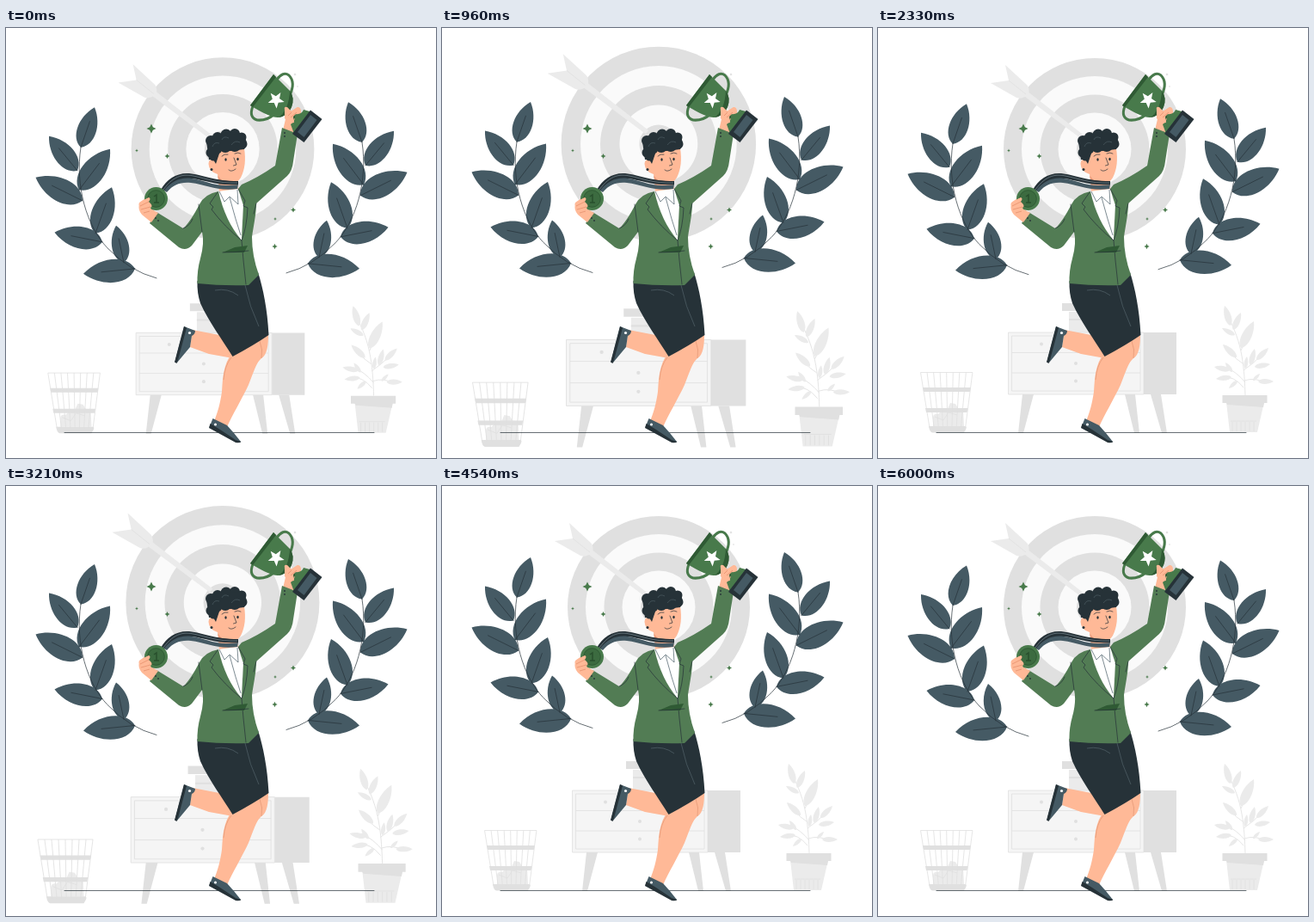
An HTML page for the animation above (6.04 s loop, 500 px wide and 500 px high).

```html
<!DOCTYPE html>
<html lang="en">
<head>
<meta charset="utf-8">
<title>Winner</title>
<style>
  html, body { margin: 0; width: 100%; height: 100%; overflow: hidden; background: #fff; }
  svg { display: block; width: 100%; height: 100%; }
  .line { fill: none; stroke: #263238; stroke-width: .7; stroke-linecap: round; stroke-linejoin: round; }
  .skin { fill: #ffb997; }
  .dark { fill: #263238; }
  .slate { fill: #455a64; }
  .green { fill: #487a4b; }
  .jacket { fill: #527c54; }
  .shade { fill: #2f5a34; }
  .g1 { fill: #e0e0e0; }
  .g2 { fill: #ebebeb; }
  .g3 { fill: #f5f5f5; }
  .thin { fill: none; stroke: #e0e0e0; stroke-width: .8; }
</style>
</head>
<body>
<svg viewBox="0 0 500 500" xmlns="http://www.w3.org/2000/svg">
  <g id="scenery">
    <g id="target"></g>
    <path class="g2" d="M148 43L173 66Q176 69 175.500 75L241 126L238 130L171 80Q166 83 161 81L131 64L152 61Z"/>
    <path class="thin" d="M152 61L172 77"/>

    <g id="cabinet">
      <path class="g1" d="M168 426H181L169 471H163ZM287 426H299L304 471H298ZM317 426H329L336 471H330Z"/>
      <path class="g1" d="M214 320H250V329H214Z"/>
      <path class="g2" d="M222 330H250V354H222Z"/>
      <path class="g1" d="M222 338H250V340H222ZM309 354H347V426H309Z"/>
      <path class="g3" d="M151.500 354H309V426H151.500Z"/>
      <path class="thin" d="M151.500 354H309V426H151.500ZM155.500 358H305V422H155.500ZM155.500 377.500H305M155.500 401H305"/>
      <g class="g1"><circle cx="190" cy="367.500" r="2"/><circle cx="230" cy="390" r="2"/><circle cx="230" cy="410.500" r="2"/></g>
    </g>

    <g id="basket">
      <path class="g2" d="M64 463V452Q65 448 70 449L75 444L80 445L84 436L90 437L93 442L99 443L100 463Z"/>
      <path class="thin" d="M66 452L76 456L82 447L92 450"/>
      <path class="g1" d="M52 418H108L107 423H53ZM55 442H104.500L103.500 447H56ZM59 463H101Q104 463 102 467L100 470.500H63Q60 470 59 463Z"/>
    </g>

    <g id="plant">
      <path class="thin" d="M427 427C426 400 425 365 405 333M425 398Q437 390 445 381M426 410Q438 406 449 412M425 418Q414 404 400 406M424 390Q416 385 410 378M422 375Q429 360 435 346M427 412Q417 400 404 394"/>
      <path class="g2" d="M405 435H449L441 470H409Z"/>
      <path class="g1" d="M400.500 427H452.500V436H400.500ZM405 436H449L448 441L406 438Z"/>
      <path class="thin" d="M412 458V469M417 458V469M422 458V469M427 458V469M432 458V469M437 458V469M410 457H440"/>
    </g>
  </g>

  <path class="line" d="M68 470.500H428"/>
  <g id="laurels"></g>
  <g id="sparkles"></g>

  <g id="legs">
    <path class="skin" d="M217 351L248 357L268 376L264 384L236 379L214 371Z"/>
    <path class="slate" d="M207 347L220 352Q220 356 216 358L214 371L199 389L196.500 388Z"/>
    <path class="dark" d="M207 347L210 348.500L200 386L198.500 390L196 388.500Z"/>
    <circle cx="213.500" cy="354.500" r="1.600" fill="#fff"/>
    <path class="skin" d="M262 379C253 392 252 405 251 423C249 437 246 447 242.500 456L257 464C263 450 274 432 282 415C288 400 291 389 297 384C304 380 305 368 305 356Z"/>
    <path d="M295 364Q299 374 297 384M262 383Q254 393 253 409" fill="none" stroke="#e59a78" stroke-width=".8"/>
    <path class="slate" d="M240.500 454L257 462L265 471L273 481L269 482L236.500 464Z"/>
    <path class="dark" d="M237.500 460L249 467L267 479L273.500 481Q272 483 267 482L236 465Z"/>
    <circle cx="243.500" cy="461" r="1.500" fill="#fff"/>
    <path class="dark" d="M222.500 294L293 284C299 303 304 327 305.500 357Q288 369 263.500 382C252 363 236 342 226 320Q222 308 222.500 294Z"/>
    <path d="M278 299Q283 324 294 347M243 305Q258 302 270 311" fill="none" stroke="#53636b" stroke-width=".7"/>
  </g>

  <g id="body">
    <path class="skin" d="M246 166H268L270 190L261 200L248 192Z"/>
    <path d="M246 190L270 187L275 205L274 247L260 227Z" fill="#fff"/>
    <path class="skin" d="M322 119L325 106L323 97Q321 92 326 92L331 97L339 92Q343 92 343 97L343 103L338 111L334 122Z"/>
    <path class="jacket" d="M247 190Q231 193 225 205C218 218 212 228 206 233L175 214L167 227L201 255Q209 260 216 253L228 237Q231 250 226 268Q222 282 222.500 297Q252 300 282 299L294 287Q286 265 286 243C288 229 291 216 291 204L327 172Q333 166 334 155L339 123L321 116L313 160Q293 174 274 182L270 187L276 206L274 247Q255 225 247 190Z"/>
    <path class="line" d="M246 191L237 204L241 208L239 211Q254 231 274 247L276 270L279 298M270 187L278 201L276 207L281 209Q280 232 274 247M228 237L224 205M291 204L288 216M206 233Q214 230 217 222"/>
    <path class="shade" d="M252 261L266 255L281 253L277 261Z"/>
    <path class="line" d="M252 261Q267 261 282 259"/>
    <path d="M248 190L254 202L260 196L270 205L269 188M260 197L267 222L273 241" fill="none" stroke="#455a64" stroke-width=".7"/>
    <g class="dark"><circle cx="174" cy="221" r=".9"/><circle cx="177" cy="224" r=".9"/><circle cx="324" cy="122" r=".9"/><circle cx="324" cy="126" r=".9"/></g>
  </g>

  <g id="head">
    <path class="skin" d="M243 143L277 140C279 153 278 164 273 174Q269 181 260 181Q250 180 246 170Q236 167 235.500 158Q236 151 243 154Z"/>
    <path d="M246 171Q251 179 259 181L267 180Q256 185 247 176Z" fill="#ef9c7b"/>
    <g id="hair" class="dark"></g>
    <path class="dark" d="M233 132Q237 123 250 124L275 123Q283 132 277 141L261 143L249 143L244 158L241 153L236 153Z"/>
    <path class="line" d="M251 149Q254 146 258 147M266 146Q270 144 273 146" stroke-width="1.100"/>
    <g class="dark"><ellipse cx="255.500" cy="153" rx="1.200" ry="1.700"/><ellipse cx="269.500" cy="152.500" rx="1.200" ry="1.700"/><circle cx="239" cy="164.500" r="1.500"/></g>
    <path class="line" d="M265 151L268 159L264.500 160M259 165Q262 168 267 164"/>
    <path d="M240 138Q242 132 248 134M251 130Q253 125 259 128M262 136Q266 130 272 133" fill="none" stroke="#53636b" stroke-width=".6"/>
  </g>

  <g id="medal">
    <path class="dark" d="M180 188C187 176 198 168 213 169C230 171 242 178 270 178V182C247 184 232 177 216 175C202 174 193 180 187 190Z"/>
    <path class="slate" d="M184 189C192 178 204 173 216 175C232 177 243 186 270 182L269 187C245 190 233 182 215 180C202 179 195 182 187 191Z"/>
    <path d="M183 188C196 170 208 170 218 172C234 175 246 181 269 180" fill="none" stroke="#7c8c93" stroke-width=".7"/>
    <path class="skin" d="M169 226L158 217Q153 211 155 205Q158 199 166 197L172 204L170 211L177 215Z"/>
    <circle class="green" cx="174.500" cy="198.500" r="13.500"/>
    <circle cx="174.500" cy="198.500" r="9.800" fill="#3c6b40" stroke="#2f5a34" stroke-width="1"/>
    <path d="M172 196L175 194V203M172 203H178" fill="none" stroke="#28502d" stroke-width="1.500"/>
    <path class="skin" d="M155 207Q153 203 158 201L166 197Q169 198 166 202L168 204Q171 207 168 209Q171 213 167 215L159 217Z"/>
    <path d="M156 207L166 202M157 211L168 208M160 215L167 213" fill="none" stroke="#e18c69" stroke-width=".7"/>
  </g>

  <g id="trophy">
    <path d="M315 60Q322 50 329 55Q337 63 330 78M287 91Q282 104 292 107Q303 108 311 101" fill="none" stroke="#487a4b" stroke-width="3"/>
    <path class="shade" d="M328 94L338 102L334 107L325 100Z"/>
    <path class="green" d="M311 54L330 73Q336 81 332 92Q328 102 317 104Q308 105 284 90Z"/>
    <path class="shade" d="M311 54L314 57L287 92L284 90ZM330 73Q336 81 332 92Q328 102 317 104Q329 95 330 73Z"/>
    <path id="star" fill="#fff"/>
    <path class="green" d="M336 100Q344 101 346 95L357 98L335 123L331 112Q337 108 336 100Z"/>
    <path class="dark" d="M354 95.500L367.500 106L346.500 133L333 123Z"/>
    <path class="slate" d="M354 101L361.500 107L346.500 127L339 121Z"/>
    <path class="skin" d="M324 95Q323 91 327 92L332 97L339 92Q343 93 340 97L334 103L335 110L329 111L324 105Z"/>
    <path d="M332 98L328 102M338 98L331 104" fill="none" stroke="#e18c69" stroke-width=".7"/>
  </g>
</svg>
<script>
const byId = id => document.getElementById(id);
const add = (id, markup) => byId(id).insertAdjacentHTML('beforeend', markup);

// Pointed leaf from base to tip; bulge is relative to its length.
function leafPath([bx, by, tx, ty], bulge = .3) {
  const dx = tx - bx, dy = ty - by;
  const at = (along, side) =>
    `${(bx + dx * along - dy * side).toFixed(1)} ${(by + dy * along + dx * side).toFixed(1)}`;
  return `M${at(0, 0)}C${at(.14, bulge)} ${at(.66, bulge)} ${at(1, 0)}` +
         `C${at(.66, -bulge)} ${at(.14, -bulge)} ${at(0, 0)}Z`;
}

function starPath(cx, cy, outer, inner, points, turn) {
  const corners = Array.from({ length: points * 2 }, (_, i) => {
    const r = i % 2 ? inner : outer, a = turn + i * Math.PI / points;
    return `${(cx + r * Math.cos(a)).toFixed(1)} ${(cy + r * Math.sin(a)).toFixed(1)}`;
  });
  return `M${corners.join('L')}Z`;
}

[106, 85, 63.5, 42.500, 21].forEach((r, i) =>
  add('target', `<circle cx="252" cy="141" r="${r}" fill="${i % 2 ? '#fafafa' : '#e0e0e0'}"/>`));

let strands = 'M49.500 400.500H110';
for (let i = 0; i <= 8; i++) strands += `M${49.5 + i * 7.55} 400.500L${60 + i * 5.2} 465`;
add('basket', `<path class="thin" d="${strands}"/>`);

const plantLeaves = [
  [410, 346, 403, 323], [413, 351, 422, 331], [415, 357, 400, 349], [422, 372, 437, 341],
  [417, 383, 401, 368], [427, 396, 429, 382], [433, 392, 438, 373], [440, 386, 454, 372],
  [438, 394, 456, 391], [412, 400, 404, 389], [409, 398, 391, 394], [411, 406, 393, 408],
  [418, 410, 408, 419], [436, 410, 444, 402], [442, 411, 460, 411]
];
add('plant', `<path class="g2" d="${plantLeaves.map(p => leafPath(p, .22)).join('')}"/>`);

const laurelLeaves = [
  [87, 139, 103, 92.5], [83, 166, 50, 126], [85, 188.5, 121, 141], [89, 201, 34.5, 174],
  [104, 239, 123, 185.5], [112, 249, 56.5, 238], [137, 273, 128, 230], [150, 280, 90, 286]
];
const rib = ([bx, by, tx, ty]) => `M${bx} ${by}L${bx + (tx - bx) * .65} ${by + (ty - by) * .65}`;
const laurel = `<path class="slate" d="${laurelLeaves.map(p => leafPath(p)).join('')}"/>
  <path class="line" d="M175 291Q144 283 118 256C94 231 80 184 87 139${laurelLeaves.map(rib).join('')}"/>`;
add('laurels', `<g>${laurel}</g><g transform="matrix(-1 0 0 1 501 -6)">${laurel}</g>`);

[[169, 117, 5.5], [187.5, 149, 3], [152, 142.5, 2], [334, 211.5, 3], [313, 222, 2], [312.5, 254, 3.2],
 [336, 54, 1.8, '#d8d8d8'], [339, 68, 1.3, '#e0e0e0']].forEach(([x, y, r, fill = '#487a4b']) =>
  add('sparkles', `<path fill="${fill}" d="${starPath(x, y, r, r * .45, 4, 0)}"/>`));

byId('star').setAttribute('d', starPath(314, 83.5, 10, 4.3, 5, -1));

[[238, 131, 6], [246, 127, 6], [256, 124, 6.5], [266, 123, 6], [274, 127, 5.5], [275, 135, 5.5],
 [266, 137, 7], [255, 138, 7], [244, 139, 8], [238, 145, 5.5], [241, 151, 3.5]].forEach(([x, y, r]) =>
  add('hair', `<circle cx="${x}" cy="${y}" r="${r}"/>`));

const LOOP = 6040, CYCLE = 6000, LEAD = 20;
const ramp = (t, from, to) => Math.min(1, Math.max(0, (t - from) / (to - from)));

function draw(time) {
  const t = Math.min(time % LOOP + LEAD, CYCLE);
  // Two beats: a rise with a slow fall, then a rise with a quick fall.
  const beat = ramp(t, 0, 600) - ramp(t, 600, 1800) + ramp(t, 2400, 3000) - ramp(t, 3000, 3600);
  byId('scenery').setAttribute('transform',
    `translate(254 230) scale(${1 + .1 * beat}) translate(-254 -230)`);
  const lift = 10 * (1 - Math.abs(t % 3000 - 1500) / 1500);
  byId('laurels').setAttribute('transform', `translate(0 ${-lift})`);
}

const start = performance.now();
function tick() {
  draw(performance.now() - start);
  requestAnimationFrame(tick);
}
tick();
</script>
</body>
</html>
```
